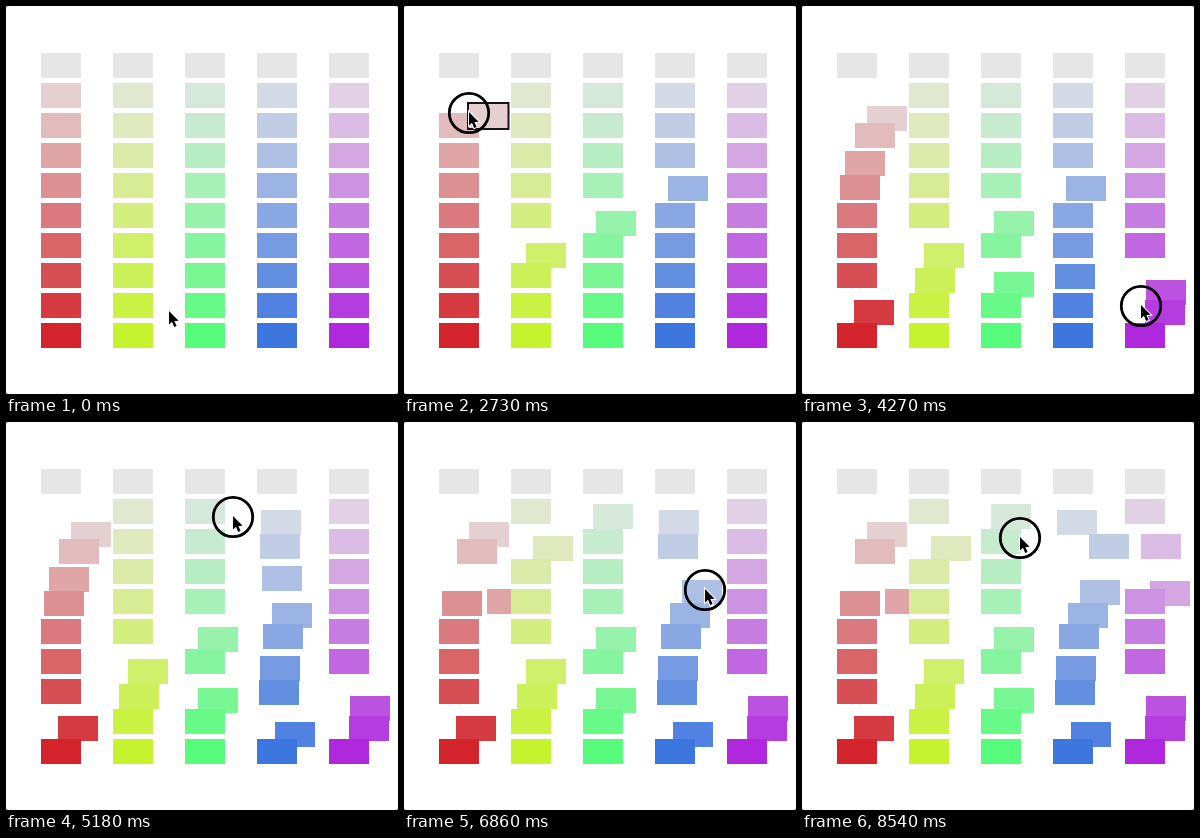
Animation of 392 by 388 pixels, one loop 8.61 s. Source, as an HTML page with a canvas:

```html
<!DOCTYPE html>
<html>
<head>
<meta charset="utf-8">
<style>
html, body { margin: 0; width: 100%; height: 100%; overflow: hidden; background: #888; }
canvas { display: block; border-radius: 3px; background: #fff; }
</style>
</head>
<body>
<canvas id="stage" width="392" height="388"></canvas>
<script>
const stage = document.getElementById('stage'), ctx = stage.getContext('2d');
const LOOP = 8610, STEP = 70, ROWS = 10, W = 40, H = 25, GRAB = 10, PRESS = 11;
const hues = ['d2242a', 'c5f32e', '58fc7c', '3e76e0', 'af28de']
  .map(hex => hex.match(/../g).map(v => parseInt(v, 16)));

// Pointer stops: cell dropped there (column and row letter), x, y,
// steps since the last stop, steps the cell was held.
let now = 0;
const stops = [
  ['', 163, 306, 0], ['', 282, 163, PRESS],
  ['De', 264, 180], ['Cf', 192, 215, 5], ['Bg', 122, 247],
  ['', 92, 256], ['', 100, 250, 1], ['', 98, 234, 3],
  ['', 66, 89, 11], ['', 65, 107], ['Ab', 65, 110, 1, 3],
  ['Ac', 53, 127, 1], ['Ad', 43, 155, 1], ['Ae', 38, 179, 1],
  ['', 25, 215, 1], ['Ai', 52, 304],
  ['Bh', 113, 272], ['Ch', 192, 276], ['Dh', 253, 268],
  ['Eh', 344, 284, 5], ['Ei', 343, 304], ['', 339, 300],
  ['Di', 269, 310], ['Dg', 254, 244, 1], ['Df', 257, 212, .5], ['De', 266, 191, .5],
  ['Dd', 256, 154], ['Dc', 254, 122], ['Db', 255, 98],
  ['Cb', 189, 92, 7], ['Bc', 129, 124, 4], ['', 83, 163, 6],
  ['Ad', 83, 177], ['Dd', 278, 168, 7], ['Ed', 348, 169, 3],
  ['', 371, 140, 3], ['Ec', 339, 122, 5], ['', 315, 116],
  ['Dc', 287, 122, 3], ['', 279, 118, 4], ['', 218, 116, 5]
].map(([key, x, y, steps = 2, hold = 1]) => ({ key, x, y, hold, at: now += steps }));

function pointerAt(t) {
  const i = stops.findIndex(s => s.at > t);
  if (i < 0) return stops[stops.length - 1];
  const a = stops[i - 1], b = stops[i], k = (t - a.at) / (b.at - a.at);
  return { x: Math.round(a.x + (b.x - a.x) * k), y: Math.round(a.y + (b.y - a.y) * k) };
}

function drawPointer({ x, y }, pressed) {
  if (pressed) {
    ctx.lineWidth = 2.8;
    ctx.strokeStyle = '#000';
    ctx.beginPath();
    ctx.arc(x, y, 19.7, 0, Math.PI * 2);
    ctx.stroke();
  }
  ctx.save();
  ctx.translate(x, y - 1);
  ctx.beginPath();
  [[0, 0], [0, 13.5], [3, 10.8], [5.2, 16], [7.6, 15], [5.4, 10], [9.6, 9.8]]
    .forEach(p => ctx.lineTo(...p));
  ctx.closePath();
  ctx.lineWidth = 2;
  ctx.strokeStyle = '#fff';
  ctx.stroke();
  ctx.fillStyle = '#000';
  ctx.fill();
  ctx.restore();
}

function fillCell(cell) {
  ctx.fillStyle = cell.color;
  ctx.fillRect(cell.x, cell.y, W, H);
}

function draw(t) {
  const pointer = pointerAt(t), cells = {};
  hues.forEach((hue, c) => {
    for (let r = 0; r < ROWS; r++) {
      cells['ABCDE'[c] + 'abcdefghij'[r]] = {
        x: 35 + 72 * c,
        y: 47 + 30 * r,
        color: `rgb(${hue.map(v => Math.round(230 + (v - 230) * r / (ROWS - 1)))})`
      };
    }
  });

  let held = null;
  for (const { key, x, y, at, hold } of stops) {
    if (!key) continue;
    const cell = cells[key];
    if (t >= at) Object.assign(cell, { x, y: y - GRAB });
    else if (t >= at - hold && !held) {
      held = cell;
      Object.assign(cell, { x: pointer.x - 1, y: pointer.y - GRAB });
    }
  }

  ctx.clearRect(0, 0, stage.width, stage.height);
  Object.values(cells).forEach(fillCell);
  if (held) {
    fillCell(held);
    ctx.lineWidth = 2;
    ctx.strokeStyle = '#1a1216';
    ctx.strokeRect(held.x, held.y, W + 0.5, H + 1);
  }
  drawPointer(pointer, t >= PRESS);
}

const start = performance.now();
function tick() {
  draw(Math.floor((performance.now() - start) % LOOP / STEP));
  requestAnimationFrame(tick);
}
tick();
</script>
</body>
</html>
```
